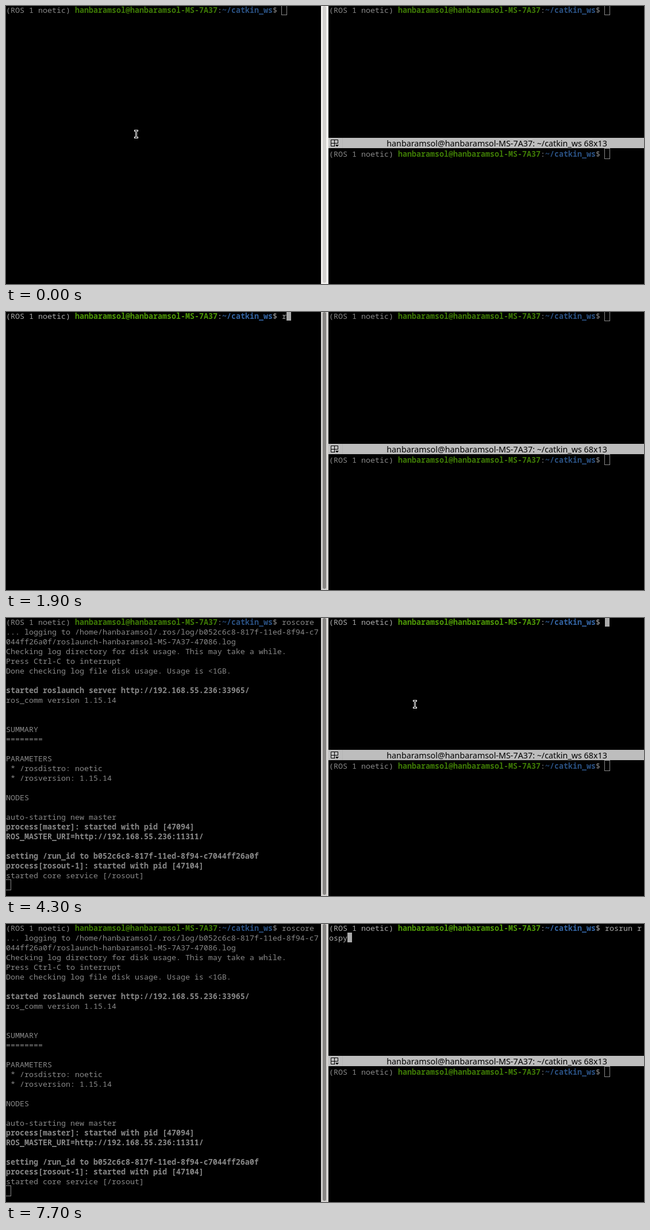
Write an HTML page with a canvas that moves like this. It is 1110 px wide and 485 px high and loops after 8000 ms.

```html
<!DOCTYPE html>
<html lang="en">
<head>
<meta charset="utf-8">
<title>Terminal panes</title>
<style>
  html, body { margin: 0; width: 100%; height: 100%; overflow: hidden; background: #000; }
  canvas { display: block; }
</style>
</head>
<body>
<canvas id="stage" width="1110" height="485"></canvas>
<script>
const ctx = document.getElementById('stage').getContext('2d');
const LOOP = 8000, TICK = 100, BLINK = 600;
const CELL = 8, LINE = 17, COLS = 68, PROMPT_COLS = 60;
const USER = 'hanbaramsol', HOST = USER + '-MS-7A37', CWD = '~/catkin_ws';
const MONO = '13.3333px "Noto Sans Mono", "DejaVu Sans Mono", monospace';
const LIVE = { text: '#aaaaaa', user: '#4e9a06', path: '#3465a4' };
const DIM = { text: '#888888', user: '#3e7b05', path: '#2a5183' };

const LEFT_CLICK = 300, RIGHT_CLICK = 4300, ENTER = 2700;
const ROSCORE = { text: 'roscore', start: 1900, gap: 100 };
const ROSRUN = { text: 'rosrun ', start: 5600, gap: 110 };
const ROSPY = { text: 'rospy', start: 7050, gap: 125 };

// A leading "!" marks a bold line.
const CHECKS = `... logging to /home/${USER}/.ros/log/b052c6c8-817f-11ed-8f94-c7
044ff26a0f/roslaunch-${HOST}-47086.log
Checking log directory for disk usage. This may take a while.
Press Ctrl-C to interrupt
Done checking log file disk usage. Usage is <1GB.
`.split('\n');
const STARTUP = `!started roslaunch server http://192.168.55.236:33965/
ros_comm version 1.15.14


SUMMARY
========

PARAMETERS
 * /rosdistro: noetic
 * /rosversion: 1.15.14

NODES

auto-starting new master
!process[master]: started with pid [47094]
!ROS_MASTER_URI=http://192.168.55.236:11311/

!setting /run_id to b052c6c8-817f-11ed-8f94-c7044ff26a0f
!process[rosout-1]: started with pid [47104]
started core service [/rosout]`.split('\n');

const clamp = (v, low = 0, high = 1) => Math.min(high, Math.max(low, v));
const lerp = (a, b, p) => a + (b - a) * p;
const smooth = p => p * p * (3 - 2 * p);
const progress = (t, start, end) => clamp((t - start) / (end - start));

const keysHit = (burst, t) =>
  clamp(Math.floor((t - burst.start) / burst.gap) + 1, 0, burst.text.length);
const typed = (burst, t) => burst.text.slice(0, keysHit(burst, t));
const lastKey = (burst, t) =>
  keysHit(burst, t) ? burst.start + (keysHit(burst, t) - 1) * burst.gap : 0;

// The blink cycle restarts with every click and key press.
const cursorShown = (t, ...resets) => (t - Math.max(...resets)) % (2 * BLINK) < BLINK;

function rect(x, y, w, h, color) {
  ctx.fillStyle = color;
  ctx.fillRect(x, y, w, h);
}

function pane(x, y, live) {
  const colors = live ? LIVE : DIM;
  const cellX = col => x + col * CELL;
  const cellY = row => y + row * LINE;

  function write(text, col, row, color = colors.text, weight = 500) {
    ctx.font = `${weight} ${MONO}`;
    ctx.fillStyle = color;
    ctx.fillText(text, cellX(col), cellY(row) + 14);
  }

  function prompt() {
    write('(ROS 1 noetic) ', 0, 0);
    write(`${USER}@${HOST}`, 15, 0, colors.user, 700);
    write(':', 46, 0);
    write(CWD, 47, 0, colors.path, 700);
    write('$', 58, 0);
  }

  function cursor(col, row, visible, under = '') {
    const cx = cellX(col), cy = cellY(row);
    if (!live) {
      ctx.strokeStyle = colors.text;
      ctx.lineWidth = 1;
      ctx.strokeRect(cx - 0.5, cy - 0.5, CELL + 1, LINE + 1);
    } else if (visible) {
      rect(cx, cy, CELL, LINE, colors.text);
      write(under, col, row, '#000');
    }
  }

  return { write, prompt, cursor };
}

function logLines(t) {
  if (t < 3000) return [];
  const streamed = Math.max(0, (t - 3100) / TICK * 14);
  return [...CHECKS, ...STARTUP.slice(0, streamed)];
}

function leftPane(t, live) {
  const p = pane(0, -2, live), command = typed(ROSCORE, t), lines = logLines(t);
  const entered = t >= ENTER;
  p.prompt();
  p.write(command, PROMPT_COLS, 0);
  lines.forEach((line, i) => {
    const bold = line[0] === '!';
    p.write(bold ? line.slice(1) : line, 0, i + 1, undefined, bold ? 700 : 500);
  });
  if (t >= 2 * LEFT_CLICK && t < 1200) rect(0, 202, COLS * CELL, LINE, '#aaaaaa');
  const shown = cursorShown(t, LEFT_CLICK, lastKey(ROSCORE, t), entered ? ENTER : 0);
  if (entered) p.cursor(0, lines.length + 1, shown);
  else p.cursor(PROMPT_COLS + command.length, 0, shown);
}

function rightPane(t, live) {
  const p = pane(562, -2, live), room = COLS - PROMPT_COLS;
  const text = typed(ROSRUN, t) + typed(ROSPY, t);
  const wrapped = text.slice(room);
  const shown = cursorShown(t, RIGHT_CLICK, lastKey(ROSRUN, t), lastKey(ROSPY, t));
  p.prompt();
  p.write(text.slice(0, room), PROMPT_COLS, 0);
  p.write(wrapped, 0, 1);
  if (wrapped) p.cursor(wrapped.length, 1, shown);
  else p.cursor(Math.min(COLS - 1, PROMPT_COLS + text.length), 0, shown, text[room - 1]);
}

function bottomPane() {
  const p = pane(562, 249, false);
  p.prompt();
  p.cursor(PROMPT_COLS, 0);
}

function scrollbar(t) {
  const fade = progress(t, LEFT_CLICK - TICK, LEFT_CLICK + 2 * TICK);
  const warmGray = level => `rgb(${level + 2}, ${level}, ${level - 2})`;
  rect(548, 0, 13, 485, warmGray(lerp(242, 209, fade)));
  ctx.fillStyle = warmGray(lerp(209, 133, fade));
  ctx.beginPath();
  ctx.roundRect(551, 0, 6, 483, 3);
  ctx.fill();
}

function titleBar() {
  rect(561, 230, 549, 18, '#bdbdbd');
  rect(585, 230, 1, 18, '#b4b4b4');
  ctx.strokeStyle = '#000';
  ctx.lineWidth = 1;
  ctx.stroke(new Path2D('M572.5 244.5H565.5V233.5H577.5V240M565.5 239.5H577.5M571.5 233.5V244.5'));
  ctx.fillStyle = '#000';
  ctx.fill(new Path2D('M573 242H579L576 245.5Z'));
  ctx.font = '14.3px "Noto Sans", "Open Sans", sans-serif';
  ctx.textAlign = 'center';
  ctx.fillText(`${USER}@${HOST}: ${CWD} 68x13`, 854, 245);
  ctx.textAlign = 'left';
}

function pointer(t) {
  const hidden = (t >= ROSCORE.start && t < 3900) || t >= ROSRUN.start;
  if (hidden) return;
  let x = 226.5, y = 223.5;
  const glide = (start, end, toX, toY) => {
    const p = smooth(progress(t, start, end));
    x = lerp(x, toX, p);
    y = lerp(y, toY, p);
  };
  glide(100, 400, 303.5, 210.5);
  glide(1100, 1200, 299.5, 148.5);
  glide(3800, RIGHT_CLICK, 711.5, 150.5);
  glide(4400, 4500, 715.5, 157.5);

  const beam = new Path2D('M-2 -6H2M-2 6H2M0 -6V6');
  ctx.save();
  ctx.translate(Math.floor(x) + 0.5, Math.floor(y) + 0.5);
  ctx.lineCap = 'square';
  for (const [width, color] of [[3, '#fff'], [1, '#000']]) {
    ctx.lineWidth = width;
    ctx.strokeStyle = color;
    ctx.stroke(beam);
  }
  ctx.restore();
}

function draw(now) {
  const t = Math.floor(now % LOOP / TICK) * TICK;
  rect(0, 0, 1110, 485, '#000');
  leftPane(t, t >= LEFT_CLICK && t < RIGHT_CLICK);
  rightPane(t, t >= RIGHT_CLICK);
  bottomPane();
  scrollbar(t);
  titleBar();
  pointer(t);
}

const start = performance.now();
function tick() {
  draw(performance.now() - start);
  requestAnimationFrame(tick);
}
tick();
</script>
</body>
</html>
```
